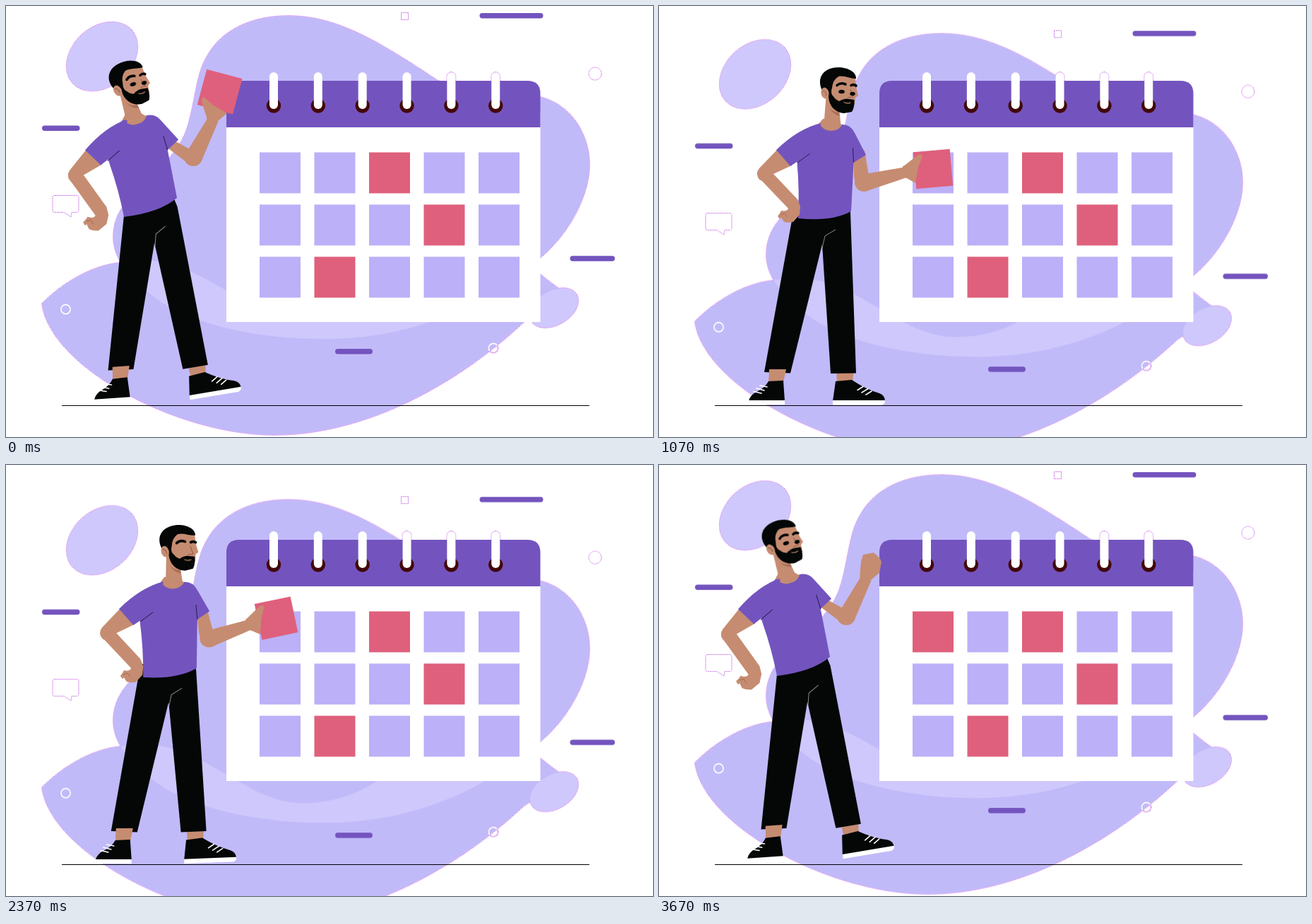
An HTML page that plays this animation: 916 px wide and 611 px high, repeating every 3710 ms.

```html
<!DOCTYPE html>
<html lang="en">
<head>
<meta charset="utf-8">
<title>Planning calendar</title>
<style>
  html, body { margin: 0; width: 100%; height: 100%; overflow: hidden; background: #fff; }
  svg { display: block; width: 916px; height: 611px; }
  .float { animation: float 3710ms 25ms cubic-bezier(.37, 0, .63, 1) infinite; }
  @keyframes float { 50% { transform: translateY(42px); animation-timing-function: cubic-bezier(.37, 0, .63, 1); } }
  .eyes { transform-box: fill-box; transform-origin: center; animation: blink 3710ms linear infinite; }
  @keyframes blink {
    0%, 18%, 23.5%, 61%, 66.7%, 100% { transform: scaleY(1); }
    19.5%, 22%, 62.5%, 65.2% { transform: scaleY(0); }
  }
  .blob { fill: #c1baf9; }
  .pale { fill: #cfc8fc; }
  .violet { fill: #7354be; }
  .cell { fill: #bcb0f8; }
  .pink { fill: #df607c; }
  .skin { fill: #c68c71; }
  .black { fill: #040706; }
  .white { fill: #fff; }
  .line { fill: none; stroke: #fff; stroke-width: 1.6; stroke-linecap: round; }
  .fold { fill: none; stroke: #2b1c55; stroke-width: 1; }
  .rim { fill: none; stroke: #c25ae4; stroke-width: 1.8; stroke-dasharray: 1 1; }
  .faint { fill: #fff; stroke: #c25ae4; stroke-width: 1; stroke-dasharray: 1.5 1; }
</style>
</head>
<body>
<svg viewBox="0 0 916 611">
  <defs>
    <path id="upper" d="M400 14C470 14 530 52 610 105C660 125 700 118 756 129C800 140 826 182 826 225C826 270 795 325 756 357C690 415 590 472 450 472C340 472 240 445 195 400C165 375 152 350 152 328C152 300 165 280 190 258C215 236 235 214 248 192C262 170 266 125 274 97C290 40 340 14 400 14Z"/>
    <path id="lower" d="M51 422C85 388 125 368 160 364C270 340 330 444 420 444C540 444 560 350 680 350C730 350 750 378 782 400C795 415 760 430 733 448C640 535 510 608 380 608C240 608 62 510 51 422Z"/>
    <ellipse id="egg" cx="136" cy="71.5" rx="56" ry="42" transform="rotate(-42 136 71.5)"/>
    <ellipse id="pebble" cx="776" cy="428" rx="37" ry="24" transform="rotate(-31 776 428)"/>
    <circle id="ringlet" cx="690" cy="485" r="6.6"/>
    <clipPath id="overlap"><use href="#upper"/></clipPath>
  </defs>

  <g id="pinRims" class="rim"></g>
  <g class="float">
    <g class="rim">
      <use href="#lower"/><use href="#upper"/><use href="#egg"/><use href="#pebble"/><use href="#ringlet"/>
    </g>
    <use href="#lower" class="blob"/>
    <use href="#upper" class="blob"/>
    <use href="#lower" class="pale" clip-path="url(#overlap)"/>
    <use href="#egg" class="pale"/>
    <use href="#pebble" class="pale"/>
    <g class="violet">
      <rect x="670.5" y="10" width="90" height="7.4" rx="3.7"/>
      <rect x="51" y="169.5" width="53.5" height="7.4" rx="3.7"/>
      <rect x="466" y="486" width="53" height="7.4" rx="3.7"/>
      <rect x="798.5" y="354.3" width="63.5" height="7.4" rx="3.7"/>
    </g>
    <rect class="faint" x="559.5" y="9.5" width="10" height="10"/>
    <circle class="faint" cx="834" cy="96" r="9"/>
    <path class="faint" d="M69 268.5H100Q103 268.5 103 271.5V289.5Q103 292.5 100 292.5H93L92 299 82 292.5H69Q66 292.5 66 289.5V271.5Q66 268.5 69 268.5Z"/>
    <circle class="line" cx="84.5" cy="430" r="6.6"/>
    <use href="#ringlet" class="line" clip-path="url(#inLower)"/>
    <clipPath id="inLower"><use href="#lower"/></clipPath>
  </g>

  <path d="M79 566.5H826" stroke="#000"/>

  <rect class="white" x="312" y="150" width="444.5" height="298"/>
  <path class="violet" d="M312 172V124Q312 106 330 106H738Q756.5 106 756.5 124V172Z"/>
  <g id="rings"></g>
  <g id="cells"></g>

  <g data-part="legL">
    <path class="black" d="M192 282L149 519 186 520.5 231 338 246 284Z"/>
  </g>
  <g data-part="footL">
    <path class="skin" d="M156 515H180L176 534H155Z"/>
    <path class="black" d="M155 532L176 531 178 560H127Q129 551 140 546 150 541 155 532Z"/>
    <path class="white" d="M127 559H178V565H129Q126 563 127 559Z"/>
    <path class="line" d="M134 546.5L145 549M138 542L149 545M143 538L153 540"/>
  </g>
  <g data-part="footR">
    <path class="skin" d="M251 515H276L274 533H252Z"/>
    <path class="black" d="M250 532L273 530Q292 543 312 549 320 552 320 560H246Z"/>
    <path class="white" d="M246 559H320Q321 563 316 565.5H246Z"/>
    <path class="line" d="M281 544.5L289 539.5M287 548L296 542.5M293 551L301 546"/>
  </g>
  <g data-part="legR">
    <path class="black" d="M205 284L268 280 271 292 279 520.5 243 521 231 338Z"/>
    <path fill="none" stroke="#8f8a86" stroke-width="1" d="M250 317L235 326 231 343"/>
  </g>

  <g data-part="armR">
    <path class="skin" d="M275 196L276 242Q279 258 290 263L302 250 297 240 291 205Z"/>
  </g>
  <g data-part="torso">
    <path class="violet" d="M228 166L258 168Q271 167 277 180L293 211 275.5 222 272 291Q245 306 197 301 199 262 195.5 222L196 190Z"/>
    <path class="skin" d="M227 166Q232 177 243 177 254 177 259 169L250 160 232 160Z"/>
    <path class="fold" d="M274.5 201L275.5 222"/>
  </g>
  <g data-part="foreL">
    <path class="skin" d="M140 242L183 287Q181 292 173 290L171 294 168 298 171 302 173 300 177 306Q184 308 190 306L199 296 200 284 196 274 160 236Z"/>
    <path fill="none" stroke="#9c6450" stroke-width=".8" d="M172 296L178 294 182 299"/>
  </g>
  <g data-part="armL">
    <path class="skin" d="M168 203L142 230Q135 238 143 247L152 247 160 239 188 226Z"/>
    <path class="violet" d="M229 166Q197 174 166 204L186 227 206 214 222 200Z"/>
    <path class="fold" d="M214 209L196 222"/>
  </g>
  <g data-part="foreR">
    <path class="skin" d="M287 239L347 228.5 351 243 292 263Z"/>
    <circle class="skin" cx="290" cy="250" r="13"/>
  </g>
  <g data-part="hand">
    <path class="skin" d="M345 227L359 223Q368 220 378 220L386 233Q382 246 377 248L362 250.5 349 243Z"/>
    <g id="held">
      <rect class="pink" x="362" y="205" width="52" height="52" transform="rotate(-5 388 231)"/>
      <path class="skin" d="M345 228L363 214Q371 208 373 213L367 229 364 245 350 244Z"/>
    </g>
  </g>

  <g data-part="head">
    <path class="skin" d="M237 122L233.5 167Q244 174 257.5 169L255 145Z"/>
    <path fill="#a96f59" d="M241 143Q246 151 255 151L255.5 156Q245 153 241 143Z"/>
    <path class="skin" d="M237 108Q250 90 278 101L279.5 117 282 127 278 130 277 140 262 148 243 138Z"/>
    <path class="black" d="M237 119Q236 115 231 120C224 106 229 92 245 88C262 84 280 92 279 103C270 103 262 98 254 100Q246 105 245 116Q243 122 245 126L250 132 255 135Q263 130 270 132L276.5 133Q277 144 273 150L262 152C249 151 240 141 240 127Z"/>
    <ellipse class="skin" cx="235" cy="123.5" rx="5.5" ry="8" transform="rotate(-12 235 123.5)"/>
    <path fill="none" stroke="#8d5846" stroke-width="1" d="M232 120Q237 121 237 127M271 118L274.5 129 267 129.5"/>
    <path fill="none" stroke="#040706" stroke-width="3.6" stroke-linecap="round" d="M252 112.5Q257 108 264 111M272 112.5Q276 110.5 279 113"/>
    <g class="eyes black">
      <ellipse cx="258.5" cy="121.5" rx="4.3" ry="2.8"/>
      <ellipse cx="274" cy="124.5" rx="3.7" ry="2.7"/>
    </g>
    <path fill="none" stroke="#c68c71" stroke-width="1.2" stroke-linecap="round" d="M262 136.5Q267 139 271 137"/>
  </g>
</svg>
<script>
const LOOP = 3710, PLACED = 2660;

// Joint positions (or an angle) when leaning back, touching the grid, and half way back.
const joints = {
  neck:   [[183, 163], [243, 172], [212, 165]],
  hemL:   [[167, 299], [197, 301], [185, 301]],
  hemR:   [[242, 272], [272, 291], [263, 278]],
  skull:  [[178, 152], [244, 160], [210, 154]],
  shL:    [[157, 186], [212, 190], [186, 188]],
  elbL:   [[99, 239], [150, 237], [125, 238]],
  wriL:   [[137, 293], [192, 282], [167, 287]],
  shR:    [[238, 199], [284, 214], [260, 205]],
  elbR:   [[265, 214], [290, 250], [278, 231]],
  wriR:   [[294, 160], [349, 236], [329, 196]],
  hipL:   [[188, 300], [211, 300], [205, 300]],
  ankL:   [[162, 516], [167, 520], [166, 520]],
  hipR:   [[225, 295], [252, 300], [245, 297]],
  ankR:   [[268, 511], [261, 520], [281, 516]],
  headA:  [[-18], [0], [-14]],
  handA:  [[-70], [0], [-30]],
  footLA: [[-4], [0], [0]],
  footRA: [[-9.5], [0], [-9.5]]
};
const BACK = 0, TOUCH = 1, HALF = 2;
const keys = [[0, BACK], [980, TOUCH], [1070, TOUCH], [1790, HALF], [2640, TOUCH], [2780, TOUCH], [3670, BACK], [LOOP, BACK]];

const $ = id => document.getElementById(id);
const parts = {};
document.querySelectorAll('[data-part]').forEach(g => parts[g.dataset.part] = g);

const ringX = [...Array(6).keys()].map(i => 379 + i * 62.85);
const pin = x => `<rect x="${x - 6}" y="94" width="12" height="52" rx="6"/>`;
$('pinRims').innerHTML = ringX.map(pin).join('');
$('rings').innerHTML = ringX.map(x =>
  `<circle cx="${x}" cy="141.5" r="10.2" fill="#42080a"/><g class="white">${pin(x)}</g>`
).join('');

const marked = [2, 8, 11];
$('cells').innerHTML = [...Array(15).keys()].map(i =>
  `<rect class="${marked.includes(i) ? 'pink' : 'cell'}" x="${359 + i % 5 * 77.5}" y="${207.5 + Math.floor(i / 5) * 74}" width="58" height="58"/>`
).join('');
const target = $('cells').firstElementChild;

function poseAt(t) {
  const i = keys.findIndex(k => k[0] > t);
  const [t0, a] = keys[i - 1], [t1, b] = keys[i];
  const e = (1 - Math.cos(Math.PI * (t - t0) / (t1 - t0))) / 2;
  const pose = {};
  for (const n in joints) pose[n] = joints[n][a].map((v, k) => v + (joints[n][b][k] - v) * e);
  return pose;
}

const rest = n => joints[n][TOUCH];
const put = (part, m) => parts[part].setAttribute('transform', `matrix(${m.map(v => v.toFixed(4))})`);

// Turn and scale by (c, s), carrying one point onto another.
const place = (part, [x0, y0], [x, y], c, s) =>
  put(part, [c, s, -s, c, x - c * x0 + s * y0, y - s * x0 - c * y0]);

function bone(part, p, from, to) {
  const a = rest(from), b = rest(to);
  const ux = b[0] - a[0], uy = b[1] - a[1];
  const vx = p[to][0] - p[from][0], vy = p[to][1] - p[from][1];
  const d = ux * ux + uy * uy;
  place(part, a, p[from], (vx * ux + vy * uy) / d, (vy * ux - vx * uy) / d);
}

function turn(part, p, at, angle) {
  const r = p[angle][0] * Math.PI / 180;
  place(part, rest(at), p[at], Math.cos(r), Math.sin(r));
}

// Affine map that carries three resting joints onto their posed places.
function skew(part, p, o, i, j) {
  const sub = (a, b) => [a[0] - b[0], a[1] - b[1]];
  const O = rest(o), [ux, uy] = sub(rest(i), O), [vx, vy] = sub(rest(j), O);
  const [px, py] = sub(p[i], p[o]), [qx, qy] = sub(p[j], p[o]);
  const d = ux * vy - uy * vx;
  const a = (px * vy - qx * uy) / d, b = (py * vy - qy * uy) / d;
  const c = (qx * ux - px * vx) / d, e = (qy * ux - py * vx) / d;
  put(part, [a, b, c, e, p[o][0] - a * O[0] - c * O[1], p[o][1] - b * O[0] - e * O[1]]);
}

function draw(t) {
  const p = poseAt(t);
  bone('legL', p, 'hipL', 'ankL');
  bone('legR', p, 'hipR', 'ankR');
  bone('armL', p, 'shL', 'elbL');
  bone('foreL', p, 'elbL', 'wriL');
  bone('armR', p, 'shR', 'elbR');
  bone('foreR', p, 'elbR', 'wriR');
  turn('footL', p, 'ankL', 'footLA');
  turn('footR', p, 'ankR', 'footRA');
  turn('hand', p, 'wriR', 'handA');
  turn('head', p, 'skull', 'headA');
  skew('torso', p, 'hemL', 'hemR', 'neck');
  const placed = t >= PLACED;
  $('held').style.display = placed ? 'none' : '';
  target.setAttribute('class', placed ? 'pink' : 'cell');
}

let start;
function tick(now) {
  start ??= now;
  draw(Math.max(0, now - start) % LOOP);
  requestAnimationFrame(tick);
}
draw(0);
requestAnimationFrame(tick);
</script>
</body>
</html>
```
